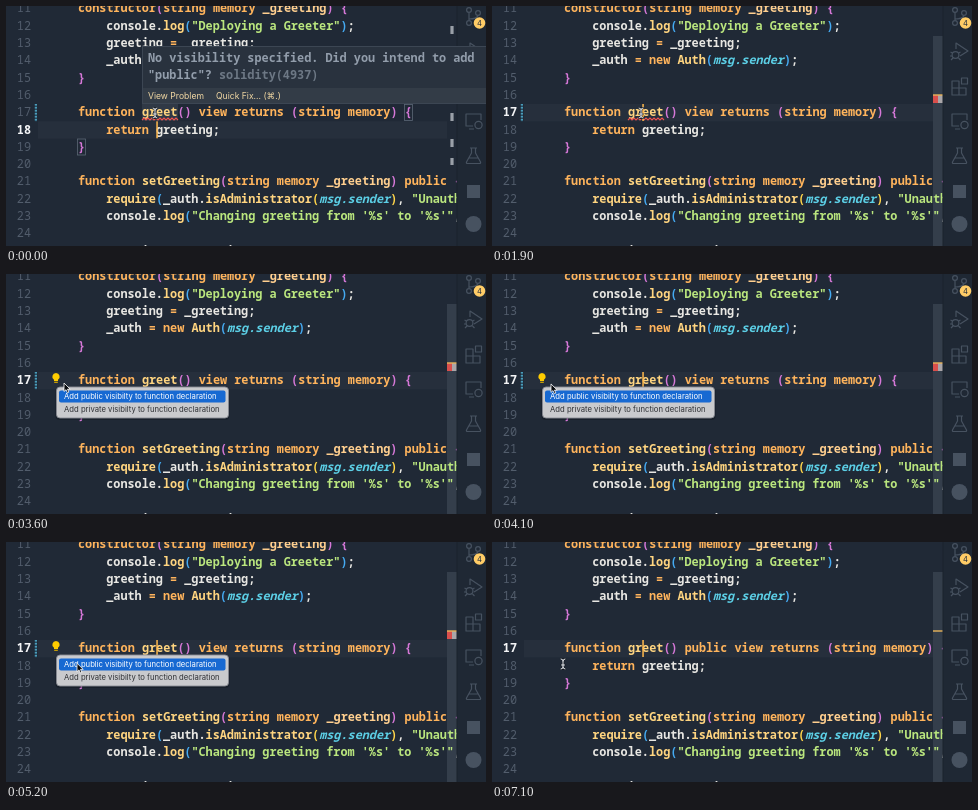
An HTML page that plays this animation: 480x240 px, repeating every 7200 ms.

```html
<!DOCTYPE html>
<html lang="en">
<head>
<meta charset="utf-8">
<style>
  html, body { margin: 0; width: 100%; height: 100%; overflow: hidden; background: #202936; }
  svg { display: block; width: 480px; height: 240px; }
  text { white-space: pre; }
  .mono { font: 600 11.83px "Noto Sans Mono", "DejaVu Sans Mono", monospace; fill: #e8e7e3; }
  .ui { font: 7.7px Inter, "Liberation Sans", sans-serif; }
  .num { font-weight: 400; fill: #525d6c; text-anchor: end; }
  .num.on { font-weight: 600; fill: #f2f3f5; }
  .key { fill: #ffb45c; }
  .fn { fill: #ffd580; }
  .str { fill: #bae67e; }
  .msg { fill: #5ccfe6; font-style: italic; }
  .arg { fill: #ffcf8f; }
  .d0 { fill: #ffd54a; }
  .d1 { fill: #d678d8; }
  .d2 { fill: #45aaf2; }
  .icons { fill: none; stroke: #475260; stroke-width: 1.2; stroke-linejoin: round; }
</style>
</head>
<body>
<svg viewBox="0 0 480 240">
  <rect width="480" height="240" fill="#202936"/>
  <rect id="band" x="32" width="409" height="17.3" fill="#262f3c"/>
  <g id="diff">
    <rect x="28.8" y="98" width="2.2" height="17.3" fill="#27495d"/>
    <path d="M29.9 98V115.3" stroke="#4a9cba" stroke-width="2.2" stroke-dasharray="1.5 1.5"/>
  </g>
  <g id="match">
    <rect x="136" y="98" width="36" height="17" fill="#303946"/>
    <g fill="none" stroke="#5b6675" stroke-width=".8">
      <rect x="398.5" y="98.5" width="8" height="16"/>
      <rect x="71.5" y="133" width="8" height="16"/>
    </g>
    <path d="M446 20v8M446 107v8M446 133v8M446 152v7" stroke="#9aa0a8" stroke-width="3.2"/>
  </g>
  <rect id="slider" x="441" y="30" width="10" height="210" fill="#343e4b"/>
  <g id="block">
    <rect x="441" y="89" width="5" height="8" fill="#d94f4c"/>
    <rect x="446" y="89" width="5" height="8" fill="#aaa6a9"/>
  </g>
  <path id="thin" d="M441 97H451" stroke="#e2524e" stroke-width="1.6"/>
  <path id="rulerCaret" d="M441 89H451" stroke="#e8b45a" stroke-width="1.4"/>

  <g id="code"></g>
  <path id="squiggle" fill="none" stroke="#f0524f" stroke-width="1.1"/>
  <rect id="caret" x="150.3" width="1.5" height="17" fill="#ffb84d"/>
  <g id="bulb">
    <path d="M50 99a3.7 3.700 0 0 1 2 6.800v1.300h-4v-1.300a3.700 3.700 0 0 1 2-6.800z" fill="#ffcc00"/>
    <path d="M48.200 108.300h3.600" stroke="#d6a900" stroke-width="1.2"/>
  </g>

  <rect x="451" width="29" height="240" fill="#1f2834"/>
  <path d="M451 0V240" stroke="#1a222d"/>
  <g class="icons">
    <circle cx="463" cy="4" r="2.4"/><circle cx="463" cy="17" r="2.4"/><circle cx="472" cy="7" r="2.4"/>
    <path d="M463 6.5V14.5M472 9.5Q471 13 463 13"/>
    <path d="M464 43V37L476 45L468 50"/>
    <circle cx="463.5" cy="49" r="3.4"/>
    <path d="M458.5 46l2 1M458 50h2M459 54l2-2M468.5 46l-2 1M468.5 54l-2-2"/>
    <path d="M460 75h7v14h-7zM460 82h14v7h-14M469.5 72h6v6h-6z"/>
    <path d="M467 120h-7v-12h15v6M463 123h5"/><circle cx="472.5" cy="119" r="3.6"/>
    <path d="M464 142h7M465.5 142v5l-5 9q-.5 1.5 1 1.5h12q1.5 0 1-1.5l-5-9v-5M463 152h9"/>
  </g>
  <rect x="461" y="179" width="13" height="13" fill="#475260"/>
  <circle cx="467.5" cy="218" r="8" fill="#475260"/>
  <circle cx="473.5" cy="17" r="5.8" fill="#ffcc66"/>
  <text class="ui" x="473.5" y="19.8" text-anchor="middle" font-weight="600" fill="#27303d">4</text>

  <g id="hover">
    <rect x="136.5" y="40.5" width="345" height="57" fill="#29323e" stroke="#3c4653"/>
    <rect x="137" y="82" width="343" height="15" fill="#333c47"/>
    <g class="mono" style="fill:#929dab">
      <text x="142" y="55.5">No visibility specified. Did you intend to add</text>
      <text x="142" y="73">"public"? <tspan fill="#6d7885">solidity(4937)</tspan></text>
    </g>
    <g class="ui" style="font-size:8.6px" fill="#f3d9a4">
      <text x="142" y="93">View Problem</text>
      <text x="210" y="93">Quick Fix... (⌘.)</text>
    </g>
  </g>

  <g id="menu" class="ui">
    <rect x="49.5" y="113" width="174" height="33" rx="4" fill="#0b1018" opacity=".35"/>
    <rect x="50.5" y="113" width="172" height="31" rx="3.5" fill="#c9cacd" stroke="#888b92" stroke-width=".9"/>
    <rect x="53" y="116.5" width="166.5" height="12" rx="2" fill="#1769d2"/>
    <text x="58" y="125.2" fill="#fff">Add public visibilty to function declaration</text>
    <text x="58" y="138" fill="#303236">Add private visibilty to function declaration</text>
  </g>

  <circle id="ring" cx="71" cy="122.3" r="12" fill="none" stroke="#0a0d12" stroke-width="2.3"/>
  <g id="mouse">
    <g id="beam" fill="none" stroke-linecap="round">
      <path id="beamEdge" stroke="#10151d" stroke-width="2.2"/>
      <path id="beamCore" stroke="#e9edf2" stroke-width="1"/>
    </g>
    <path id="arrow" d="M0 0V8.5L2 6.7L3.4 9.8L4.9 9.1L3.5 6.2H6.2z" fill="#090b0e" stroke="#fff" stroke-width=".8"/>
    <path id="hand" d="M0-1Q1.2-1.4 1.5 0V2.5Q5 2.4 5.2 4.5Q5.2 8 3.8 9H0L-2.4 5.5Q-2.4 4-.5 5L-.7 0Q-.7-.8 0-1z" fill="#fff" stroke="#11161e" stroke-width=".8"/>
  </g>
</svg>
<script>
const LOOP = 7200, PITCH = 17.3;
const CLICK = 1900, MENU = 3350, CLOSE = 5300, EDIT = 5400, CLEAR = 6300;
const $ = id => document.getElementById(id);
const show = (id, on) => $(id).style.display = on ? '' : 'none';
const baseline = n => 110.2 + (n - 17) * PITCH;

const greet = mod => `function greet() ${mod}view returns (string memory) {`;
// line number: [indent level, text]
const lines = {
  11: [1, 'constructor(string memory _greeting) {'],
  12: [2, 'console.log("Deploying a Greeter");'],
  13: [2, 'greeting = _greeting;'],
  14: [2, '_auth = new Auth(msg.sender);'],
  15: [1, '}'],
  16: [1, ''],
  17: [1, greet('')],
  18: [2, 'return greeting;'],
  19: [1, '}'],
  20: [1, ''],
  21: [1, 'function setGreeting(string memory _greeting) public {'],
  22: [2, 'require(_auth.isAdministrator(msg.sender), "Unauthorized");'],
  23: [2, `console.log("Changing greeting from '%s' to '%s'", greeting, _greeting);`],
  24: [2, ''],
  25: [2, 'greeting = _greeting;']
};

const kinds = [
  ['str', /^"/], ['msg', /^msg/], ['arg', /^_greeting/],
  ['key', /^(constructor|function|string|memory|view|returns?|public|new|=)$/]
];
const tokens = /"[^"]*"|msg\.sender|_greeting(?=\))|\b(?:constructor|function|string|memory|view|returns?|public|new)\b|\w+(?=\()|[(){}=]/g;

// Brackets are coloured by nesting depth.
function highlight([level, text]) {
  let depth = text === '}' ? level + 1 : level;
  return text.replace(tokens, s => {
    let kind = (kinds.find(k => k[1].test(s)) || ['fn'])[0];
    if ('({'.includes(s)) kind = 'd' + depth++ % 3;
    else if (')}'.includes(s)) kind = 'd' + --depth % 3;
    return `<tspan class="${kind}">${s}</tspan>`;
  });
}

$('code').innerHTML = Object.entries(lines).map(([n, line]) => {
  const y = baseline(n);
  return `<text id="n${n}" class="mono num" x="25" y="${y}">${n}</text>
    <text id="l${n}" class="mono" x="${line[0] === 1 ? 72 : 100.2}" y="${y}">${highlight(line)}</text>`;
}).join('');

const before = $('l17').innerHTML, after = highlight([1, greet('public ')]);
let edited = false;

$('squiggle').setAttribute('d', 'M136 114' + 'l2-2l2 2'.repeat(9));
for (const id of ['beamEdge', 'beamCore'])
  $(id).setAttribute('d', 'M-2-5Q0-5 0-3V3Q0 5-2 5M2-5Q0-5 0-3M0 3Q0 5 2 5M-1.5 1h3');

// time, x, y
const path = [
  [0, 149, 107], [1950, 149, 107], [2600, 58, 103], [2800, 58, 103], [3050, 52, 105],
  [3300, 52, 105], [3500, 58, 109], [4050, 58, 109], [4350, 71, 121], [LOOP, 71, 122]
];

function mouseAt(t) {
  const i = path.findIndex(p => p[0] > t), a = path[i - 1], b = path[i];
  const u = (t - a[0]) / (b[0] - a[0]), e = u * u * (3 - 2 * u);
  return [1, 2].map(k => a[k] + (b[k] - a[k]) * e);
}

function draw(t) {
  const clicked = t >= CLICK, done = t >= EDIT, menu = t >= MENU && t < CLOSE;
  const active = clicked ? 17 : 18, top = baseline(active) - 12.2;
  for (const n of [17, 18]) $('n' + n).classList.toggle('on', n === active);
  $('band').setAttribute('y', top);
  $('caret').setAttribute('y', top);

  const blinkStart = t >= 5700 ? 5700 : clicked ? CLICK : 0;
  show('caret', (t - blinkStart) % 1000 < 500 || (done && t < 5700));
  if (done !== edited) {
    edited = done;
    $('l17').innerHTML = done ? after : before;
  }

  show('hover', !clicked);
  show('match', !clicked);
  show('slider', clicked);
  show('diff', !done);
  show('squiggle', t < CLEAR && !menu);
  show('bulb', t >= 2200 && t < CLEAR);
  show('block', clicked && !done);
  show('thin', done && t < CLEAR);
  show('rulerCaret', clicked);
  show('menu', menu);
  show('ring', t >= 4700 && t < 5150);

  const shape = t < 2900 || t >= CLEAR ? 'beam' : menu ? 'arrow' : 'hand';
  for (const s of ['beam', 'arrow', 'hand']) show(s, s === shape);
  $('mouse').setAttribute('transform', `translate(${mouseAt(t)})`);
}

const start = performance.now();
function tick() {
  draw((performance.now() - start) % LOOP);
  requestAnimationFrame(tick);
}
tick();
</script>
</body>
</html>
```
